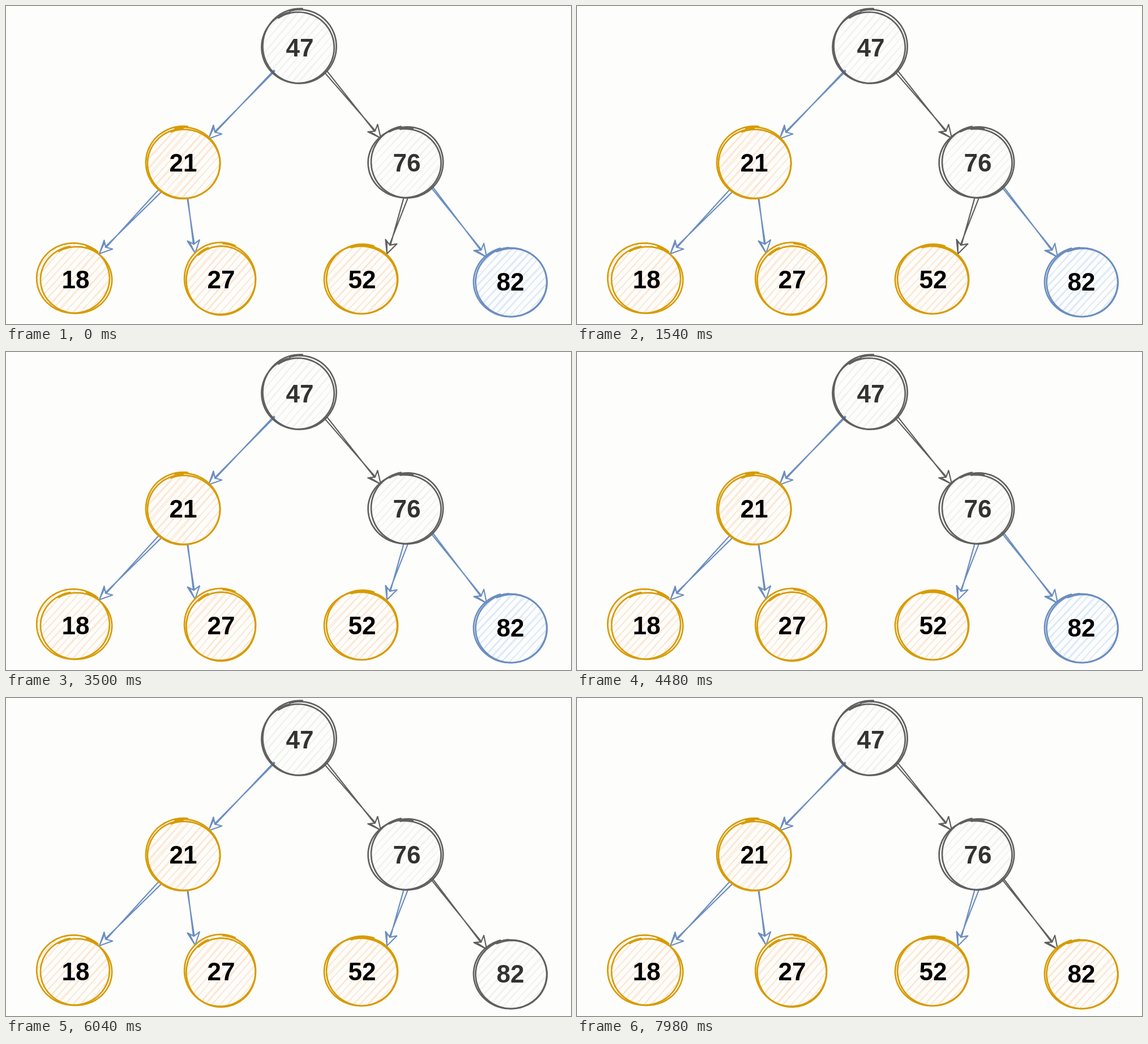
These frames come from a looping animation (998x561 px, 8000 ms). An HTML page:

```html
<!DOCTYPE html>
<html lang="en">
<head>
<meta charset="utf-8">
<title>Tree traversal</title>
<style>
  html, body { margin: 0; width: 100%; height: 100%; overflow: hidden; background: #fdfdfb; }
  svg { display: block; width: 100%; height: 100%; }
  path { fill: none; stroke-linecap: round; stroke-linejoin: round; }
  .outline { stroke: var(--ink); stroke-width: 2.7; }
  .hatch { stroke: var(--tint); stroke-width: 1.5; }
  text { font: bold 44px "Liberation Sans", Arial, sans-serif; text-anchor: middle; fill: var(--label); }
  .todo { --ink: #6c8ebf; --tint: #dae8fc; --label: #000; }
  .open { --ink: #606060; --tint: #f1f1f1; --label: #333; }
  .done { --ink: #d79b00; --tint: #fde5d0; --label: #000; }
</style>
</head>
<body>
<svg viewBox="0 0 998 561" preserveAspectRatio="none"></svg>
<script>
const LOOP = 8000;
const RETURN_LEFT = 3400, ENTER_RIGHT = 5020, FINISH_RIGHT = 6940, LABEL_FADE = 600;

// label: text position, then two pen passes as [cx, cy, rx, ry, start angle]
const NODES = {
  47: { at: [519, 89], state: 'open', passes: [[519, 71, 65, 65.5, -1.85], [516, 73, 64, 63, -2.15]] },
  21: { at: [313, 292], state: 'done', passes: [[313, 276.5, 65.5, 63.5, -1.8], [314.5, 278, 64, 61, -1.95]] },
  76: { at: [708, 292], state: 'open', passes: [[704.5, 277, 64.5, 61, -1.7], [709, 275.5, 63.5, 63, -2.1]] },
  18: { at: [123, 498], state: 'done', passes: [[119, 480.5, 64.5, 61.5, -1.2], [124.5, 483, 63, 59, -2.1]] },
  27: { at: [380, 498], state: 'done', passes: [[378.5, 481, 63, 63, -1.5], [380, 484, 61, 61, -2.3]] },
  52: { at: [629, 498], state: 'done', passes: [[627, 483, 64.5, 60, -1.85], [629.5, 482, 63, 61, -1.6]] },
  82: { at: [891, 502], state: 'todo', passes: [[891, 487, 64.5, 61, -2.2], [893, 487.5, 63, 60.5, -2]] }
};

// start x, y, tip x, y, gap between the two strokes at the start
const ARROWS = {
  '47-21': { line: [474, 114, 358, 234, 2], state: 'todo' },
  '47-76': { line: [564, 115, 662, 233, 5], state: 'open' },
  '21-18': { line: [271, 327, 165, 437, 6], state: 'todo' },
  '21-27': { line: [321, 341, 334, 436, 1], state: 'todo' },
  '76-52': { line: [706, 339, 673, 437, 7], state: 'open' },
  '76-82': { line: [751, 318, 849, 443, 3], state: 'todo' }
};

const svg = document.querySelector('svg');

function add(parent, tag, attributes = {}) {
  const element = document.createElementNS(svg.namespaceURI, tag);
  for (const [name, value] of Object.entries(attributes)) element.setAttribute(name, value);
  return parent.appendChild(element);
}

function seededRandom(seed) {
  return () => (seed = (seed * 16807) % 2147483647) / 2147483647;
}

const toPath = points => 'M' + points.map(p => p.map(v => v.toFixed(1)).join(' ')).join('L');

// An ellipse drawn by hand: it overshoots its start while drifting outwards.
function penLoop([cx, cy, rx, ry, start]) {
  const points = [], span = 2 * Math.PI + 0.35;
  for (let i = 0; i <= 90; i++) {
    const turn = i / 90, angle = start + turn * span;
    const scale = 0.985 + 0.03 * turn;
    points.push([cx + rx * scale * Math.cos(angle), cy + ry * scale * Math.sin(angle)]);
  }
  return toPath(points);
}

function hatching([cx, cy, rx, ry], random) {
  const slope = 49 * Math.PI / 180, c = Math.cos(slope), s = Math.sin(slope);
  const jitter = () => (random() - 0.5) * 3;
  let d = '';
  for (let offset = -0.93; offset < 0.95; offset += 0.155) {
    const half = Math.sqrt(1 - offset * offset) * 0.97;
    const end = side => [
      cx + rx * (offset * s + side * half * c) + jitter(),
      cy + ry * (offset * c - side * half * s) + jitter()
    ];
    for (let pass = 0; pass < 2; pass++) d += toPath([end(-1), end(1)]);
  }
  return d;
}

function arrowPath([x, y, tipX, tipY, gap]) {
  const length = Math.hypot(tipX - x, tipY - y);
  const ux = (tipX - x) / length, uy = (tipY - y) / length;
  const point = (back, side) => [tipX - ux * back - uy * side, tipY - uy * back + ux * side];
  const notch = point(16, 0);
  return toPath([point(length, gap / 2), point(16, -0.8)]) +
    toPath([point(length, -gap / 2), point(16, 0.8)]) +
    toPath([notch, point(23, 10.5), point(0, 0), point(22, -11), notch]) +
    toPath([point(20, 7), point(1, 0.5)]);
}

for (const arrow of Object.values(ARROWS)) {
  arrow.group = add(svg, 'g', { class: arrow.state });
  add(arrow.group, 'path', { class: 'outline', d: arrowPath(arrow.line), style: 'stroke-width:2.2' });
}

for (const [value, node] of Object.entries(NODES)) {
  node.group = add(svg, 'g', { class: node.state });
  add(node.group, 'path', { class: 'hatch', d: hatching(node.passes[0], seededRandom(value * 977)) });
  for (const pass of node.passes) add(node.group, 'path', { class: 'outline', d: penLoop(pass) });
  node.label = add(node.group, 'text', { x: node.at[0], y: node.at[1] });
  node.label.textContent = value;
}

function setState(part, state) {
  part.group.setAttribute('class', state);
}

function render(time) {
  const entered = time >= ENTER_RIGHT, finished = time >= FINISH_RIGHT;
  setState(ARROWS['76-52'], time < RETURN_LEFT ? 'open' : 'todo');
  setState(ARROWS['76-82'], entered ? 'open' : 'todo');
  setState(NODES[82], finished ? 'done' : entered ? 'open' : 'todo');
  const since = finished ? time - FINISH_RIGHT : entered ? time - ENTER_RIGHT : LABEL_FADE;
  NODES[82].label.setAttribute('opacity', Math.min(1, since / LABEL_FADE));
}

function frame() {
  render(performance.now() % LOOP);
  requestAnimationFrame(frame);
}
frame();
</script>
</body>
</html>
```
